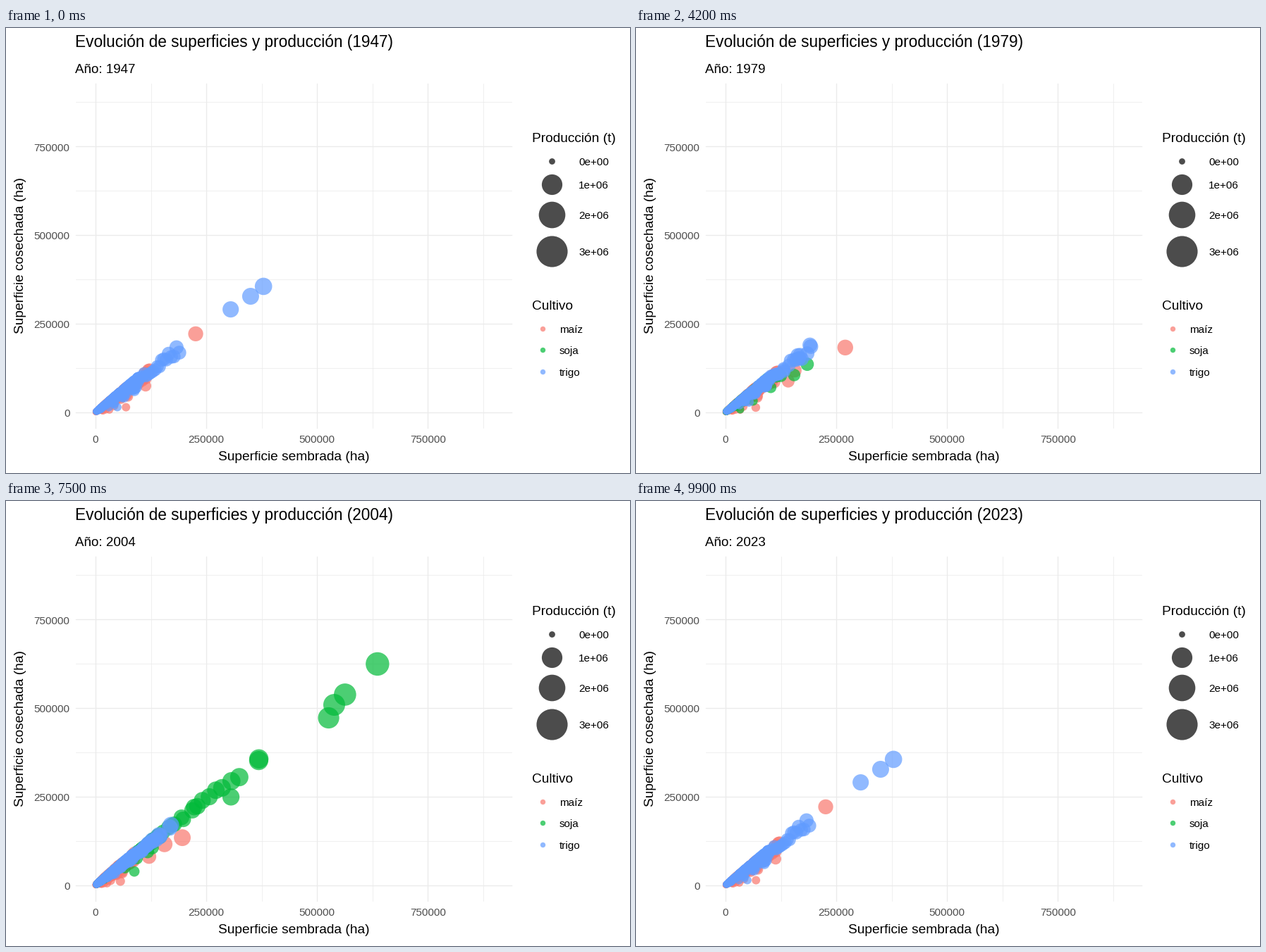
A matplotlib script that plays this animation: 885 by 632 pixels, repeating every 10000 ms.

```python
import numpy as np
import matplotlib.pyplot as plt
from matplotlib.animation import FuncAnimation

W, H, DPI = 885, 632, 100
FRAMES, FIRST, SPAN = 100, 1947, 76
N, TAIL = 170, 24  # districts per crop, of which the larger ones
COLORS = {"maíz": "#F8766D", "soja": "#00BA38", "trigo": "#619CFF"}
SOY_START = 32

# Yield (t/ha) and share of lost area, as the decades go by (s from 0 to 1)
RATE = {"maíz": lambda s: 1.7 + 4.2 * s ** 2,
        "soja": lambda s: 1.2 + 1.5 * s,
        "trigo": lambda s: 1.7 + 3 * s ** 3}
LOSS = {"maíz": lambda s: 0.1,
        "soja": lambda s: 0.06 - 0.04 * s,
        "trigo": lambda s: 0.07 - 0.06 * s}

plt.rcParams["font.family"] = "Liberation Sans"
rng = np.random.default_rng(7)
spread = {c: rng.random(N - TAIL) ** 1.25 for c in COLORS}
failure = {c: rng.exponential(1, N) ** 1.6 for c in COLORS}
wobble = {c: rng.normal(0, 1, (SPAN + 1, N, 2)) for c in COLORS}


def px(kha):
    return 127 + kha * 0.6284


def py(kha):
    return 545.5 - kha * 0.503


def radius(mt):
    return 4.4 + 10.2 * np.sqrt(mt)


def field(crop, f, reach, *leaders):
    """Planted and harvested thousand ha: leaders, a thinning tail, a dense core."""
    s, k = f / FRAMES, len(leaders)
    core = min(reach, 30 + 0.35 * reach)
    tail = np.geomspace(reach, core, TAIL - k)
    x = np.concatenate([np.zeros(k), tail, 1 + core * spread[crop]])
    fail = failure[crop].copy()
    fail[:TAIL] = np.minimum(fail[:TAIL], 1.6)
    y = x * np.maximum(0.2, 1 - LOSS[crop](s) * fail)
    rows = np.column_stack([x, y])
    if k:
        rows[:k] = leaders
    return rows


# Reach of the tail, then the few districts that stand apart
KEYS = {
    "maíz": {
        0: field("maíz", 0, 122, (226, 221), (113, 74)),
        15: field("maíz", 15, 92, (164, 158), (170, 150), (67, 16)),
        31: field("maíz", 31, 155, (240, 222), (188, 141), (210, 104)),
        53: field("maíz", 53, 75, (309, 150), (113, 87)),
        66: field("maíz", 66, 80, (288, 246), (129, 132)),
        83: field("maíz", 83, 95, (190, 119), (164, 117), (140, 90)),
    },
    "soja": {
        0: field("soja", 0, 5),
        31: field("soja", 31, 5),
        53: field("soja", 53, 205, (359, 275), (290, 200), (243, 201),
                  (230, 211), (199, 137), (120, 61)),
        66: field("soja", 66, 210, (514, 510), (510, 507), (410, 409),
                  (280, 278), (256, 257), (255, 228)),
        83: field("soja", 83, 340, (661, 659), (564, 548), (548, 526),
                  (578, 522), (397, 383), (373, 372), (325, 260)),
    },
    "trigo": {
        0: field("trigo", 0, 189, (379, 355), (350, 327), (305, 290)),
        15: field("trigo", 15, 140, (264, 259), (266, 261)),
        31: field("trigo", 31, 200),
        53: field("trigo", 53, 195),
        66: field("trigo", 66, 213),
        83: field("trigo", 83, 121, (142, 142), (145, 141)),
    },
}
GROWTH = {"maíz": (0.95, 1.15, 1.6), "soja": (1.01, 1.345, 1.02),
          "trigo": (1.1, 1.15, 1.4)}
for crop, factors in GROWTH.items():
    base = KEYS[crop][83]
    KEYS[crop].update({f: base * k for f, k in zip((77, 88, 98), factors)})


def state(crop, f):
    """Blend of key years, with a yearly swing in between."""
    if f == FRAMES - 1:  # the last step wraps to the first year
        f = 0
    times = sorted(KEYS[crop])
    i = min(np.searchsorted(times, f, side="right"), len(times) - 1)
    a, b = times[i - 1], times[i]
    u = (f - a) / (b - a)
    rows = KEYS[crop][a] * (1 - u) + KEYS[crop][b] * u

    t = f * SPAN / (FRAMES - 1)
    j = min(int(t), SPAN - 1)
    swing = wobble[crop][j] * (1 - t + j) + wobble[crop][j + 1] * (t - j)
    amp = 0.035 * min(1, 4 * u, 4 * (1 - u))
    rows *= 1 + amp * swing[:, :1]
    rows[:, 1] *= 1 - amp * np.abs(swing[:, 1])
    return rows, radius(rows[:, 1] * RATE[crop](f / FRAMES) / 1000)


def area(r):
    return (2 * np.asarray(r) * 72 / DPI) ** 2


fig = plt.figure(figsize=(W / DPI, H / DPI), dpi=DPI, facecolor="white")
ax = fig.add_axes([0, 0, 1, 1])
ax.set(xlim=(0, W), ylim=(H, 0))
ax.axis("off")


def label(x, y, s, size, color="black", **kw):
    return ax.text(x, y, s, fontsize=size * 72 / DPI, color=color,
                   va="baseline", **kw)


def dots(x, y, r, color):
    return ax.scatter(x, y, s=area(r), c=color, alpha=0.7, linewidths=0)


for k in range(0, 876, 125):
    major = k % 250 == 0
    style = dict(color="#EBEBEB", lw=(1.4 if major else 0.75) * 72 / DPI,
                 zorder=0)
    ax.plot([px(k)] * 2, [79, 568], **style)
    ax.plot([99, 717], [py(k)] * 2, **style)
    if major:
        name = str(k * 1000)
        label(px(k), 589, name, 15.3, "#4D4D4D", ha="center")
        label(90.5, py(k) + 6.5, name, 15.3, "#4D4D4D", ha="right")

label(408.5, 614.5, "Superficie sembrada (ha)", 19.2, ha="center")
label(25, 323.5, "Superficie cosechada (ha)", 19.2, ha="center",
      rotation=90, rotation_mode="anchor")

label(746, 162, "Producción (t)", 19.2)
for mt, y in enumerate((188.5, 222, 264.5, 317)):
    dots([774], [y], [radius(mt)], "black")
    label(812, y + 6.3, f"{mt}e+0{6 if mt else 0}", 15.3)
label(746, 400.5, "Cultivo", 19.2)
for i, (crop, color) in enumerate(COLORS.items()):
    y = 426.8 + 30.4 * i
    dots([760.7], [y], [3.7], color)
    label(785, y + 6.3, crop, 15.3)

title = label(98.5, 27, "", 22.6)
subtitle = label(98.5, 63.5, "", 18.8)
clouds = {c: dots(np.zeros(N), np.zeros(N), np.ones(N), col)
          for c, col in COLORS.items()}


def draw(f):
    year = FIRST + int(f * SPAN / (FRAMES - 1) + 0.4)
    title.set_text(f"Evolución de superficies y producción ({year})")
    subtitle.set_text(f"Año: {year}")
    for crop, cloud in clouds.items():
        rows, r = state(crop, f)
        cloud.set_offsets(np.column_stack([px(rows[:, 0]), py(rows[:, 1])]))
        cloud.set_sizes(area(r))
    clouds["soja"].set_visible(SOY_START <= f < FRAMES - 1)
    return [title, subtitle, *clouds.values()]


anim = FuncAnimation(fig, draw, frames=FRAMES, interval=100, repeat=True,
                     repeat_delay=0, blit=False)
plt.show()
```
